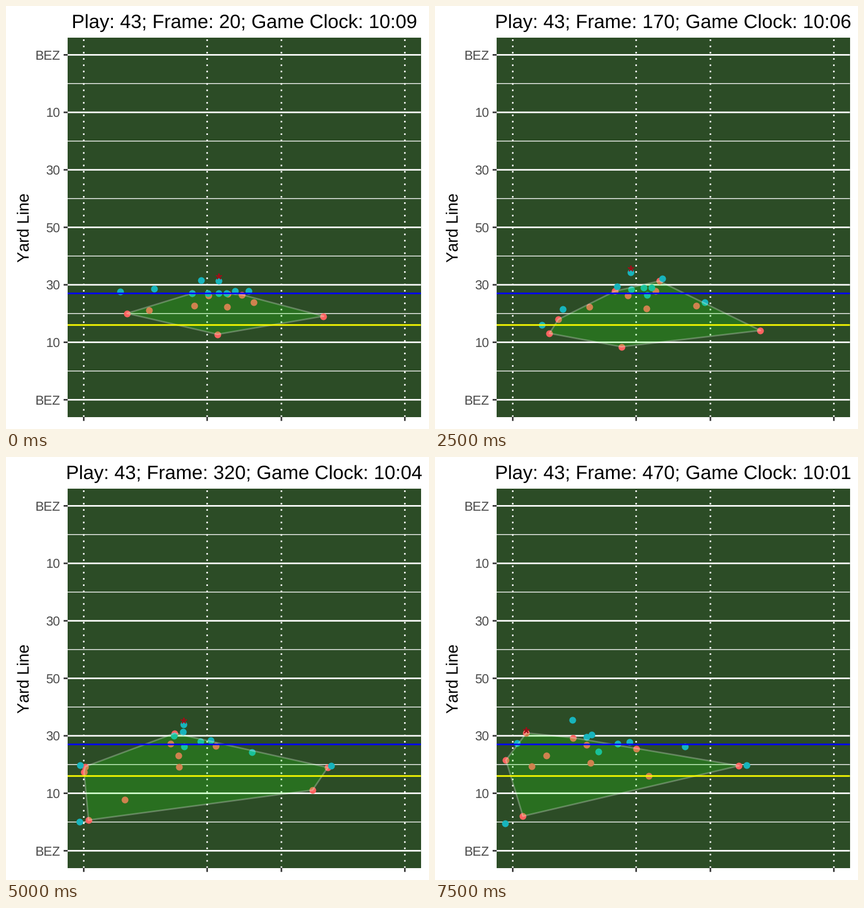
Animation of 748 by 748 pixels, one loop 8 s. Source, as a matplotlib script:

```python
import numpy as np
import matplotlib.pyplot as plt
from matplotlib.animation import FuncAnimation
from matplotlib.patches import Polygon, Rectangle

SIZE, DPI = 748, 187
STEPS, STEP_MS = 16, 500
LEFT, RIGHT, TOP, BOTTOM = 109, 733.7, 56, 726.6
MAJOR, MINOR = 2.77, 1.39
KEYS = np.array([0, 4, 10, 15])
t = np.arange(STEPS)

plt.rcParams["font.family"] = "Liberation Sans"
plt.rcParams["text.hinting"] = "none"
plt.rcParams["text.kerning_factor"] = 6  # no pair kerning


def pt(px):
    return px * 72 / DPI


# --- Motion ---------------------------------------------------------------
def route(*points):
    """Smooth run through one point per key time, starting from rest."""
    p = np.array(points, float)
    slope = np.gradient(p, KEYS, axis=0)
    slope[0] = 0
    k = np.clip(np.searchsorted(KEYS, t, side="right") - 1, 0, len(KEYS) - 2)
    h = (KEYS[k + 1] - KEYS[k])[:, None]
    u = (t - KEYS[k])[:, None] / h
    return ((1 + 2 * u) * (1 - u) ** 2 * p[k]
            + u * (1 - u) ** 2 * h * slope[k]
            + u ** 2 * (3 - 2 * u) * p[k + 1]
            + u ** 2 * (u - 1) * h * slope[k + 1])


def block(x, drift, sag):
    """Step back at the snap, then roll left with the pocket."""
    roll = (np.clip(t - 4, 0, None) / 11) ** 0.8
    step = np.clip(t / 3, 0, 1)
    return np.column_stack([x + drift * roll, 508 - 11 * step + sag * roll])


def rush(blocker, start, end):
    """Stay engaged with a blocker while the offset shifts."""
    ease = (t / t[-1])[:, None] ** 0.7
    return blocker + np.array(start) * (1 - ease) + np.array(end) * ease


left_tackle = block(329.5, -52, -6)
left_guard = block(357, -68, 24)
center = block(376.5, -53, 10)
right_guard = block(390, -46, 7)
right_tackle = route((405.5, 504), (411, 484), (313.5, 485.5), (268.5, 494.5))
passer = route((376, 485.5), (352, 472.5), (314, 473), (243, 464.5))
runner = route((345, 485), (365, 507), (435, 522), (442.5, 511.5))
receivers = [
    route((202, 504.5), (197, 549), (130, 644.5), (124.5, 648)),
    route((262, 499.5), (240, 531), (131.5, 545), (145.5, 505.5)),
    route((429, 504), (461, 520), (575.5, 545.5), (551, 545)),
]
offence = np.array(receivers + [passer, runner, left_tackle, left_guard,
                                center, right_guard, right_tackle])

catcher = route((253, 537.5), (231, 551), (138, 557), (161.5, 488))
coverage = [
    route((214, 543.5), (210, 568), (146, 642), (155.5, 635)),
    route((374, 580.5), (347, 599), (210, 605.5), (171, 547)),
    route((561.5, 548.5), (575, 569), (542, 589), (378, 563.5)),
    route((333, 530), (294, 530), (140, 547.5), (125.5, 536)),
    route((391, 532), (382, 533), (306, 548), (197.5, 528)),
    route((438, 524), (447, 527), (569, 549), (537.5, 546)),
]
rushers = [
    rush(left_tackle, (0, 0), (-9, 18)),
    rush(left_guard, (1, 3.5), (-14, 20)),
    rush(right_guard, (2, 1), (12, 12)),
    rush(right_tackle, (11.5, 6.5), (-24, 2)),
]
defence = np.array([catcher] + coverage + rushers)

# Held by the passer, thrown, then carried by the catcher
flight = np.clip((t - 11) / 2, 0, 1)[:, None]
ball = (passer + [0, -7.5]) * (1 - flight) + (catcher + [0, -5]) * flight


def convex_hull(points):
    pts = sorted(map(tuple, points))

    def chain(seq):
        out = []
        for p in seq:
            while len(out) > 1:
                (x0, y0), (x1, y1) = out[-2:]
                if (x1 - x0) * (p[1] - y0) > (y1 - y0) * (p[0] - x0):
                    break
                out.pop()
            out.append(p)
        return out[:-1]

    return chain(pts) + chain(pts[::-1])


# --- Drawing --------------------------------------------------------------
fig = plt.figure(figsize=(SIZE / DPI, SIZE / DPI), dpi=DPI, facecolor="white")
ax = fig.add_axes([0, 0, 1, 1])
ax.set_xlim(0, SIZE)
ax.set_ylim(SIZE, 0)
ax.axis("off")

field = Rectangle((LEFT, TOP), RIGHT - LEFT, BOTTOM - TOP, fc="#2C4C26", lw=0)
ax.add_patch(field)


def line(xs, ys, color, width, **kw):
    ax.plot(xs, ys, color=color, lw=pt(width), solid_capstyle="butt",
            dash_capstyle="butt", snap=False, **kw)


for k, label in enumerate(["BEZ", "10", "30", "50", "30", "10", "BEZ"]):
    y = 86.4 + 101.65 * k
    line([LEFT, RIGHT], [y, y], "white", MAJOR)
    if k < 6:
        line([LEFT, RIGHT], [y + 50.83] * 2, "white", MINOR)
    line([LEFT - 7.1, LEFT], [y, y], "#333333", MAJOR)
    ax.text(96, y + 8.2, label, ha="right", va="baseline",
            size=8.8, color="#4D4D4D")
for x in (137.5, 355.7, 487, 705.3):
    line([x, x], [BOTTOM, TOP], "white", MAJOR, ls=(0, (1, 3)))
    line([x, x], [BOTTOM, BOTTOM + 7.1], "#333333", MAJOR)
line([LEFT, RIGHT], [508.2, 508.2], "blue", MAJOR, zorder=6)
line([LEFT, RIGHT], [564.1, 564.1], "yellow", MAJOR, zorder=6)

ax.text(40.5, 391.3, "Yard Line", rotation=90, rotation_mode="anchor",
        ha="center", va="baseline", size=11)
title = ax.text(421.4, 39.2, "", ha="center", va="baseline", size=13.2)


def markers(color, z, **kw):
    return ax.plot([], [], ls="", color=color, zorder=z, snap=False,
                   clip_path=field, **kw)[0]


red_dots = markers("#FC6360", 3, marker="o", ms=pt(12), mew=0)
teal_dots = markers("#18B4BC", 4, marker="o", ms=pt(12), mew=0)
star = markers("#9B1018", 7, marker=(5, 2, 0), ms=pt(11), mew=pt(2))
hull = Polygon([(0, 0), (1, 0), (0, 1)], closed=True, fc=(0.12, 1, 0.04, 0.2),
               ec=(1, 1, 1, 0.27), lw=pt(2.77), joinstyle="round", zorder=5)
ax.add_patch(hull)
hull.set_clip_path(field)


def update(i):
    title.set_text(f"Play: 43; Frame: {20 + 30 * i}; "
                   f"Game Clock: 10:{9 - (i + 1) // 2:02d}")
    red_dots.set_data(*defence[:, i].T)
    teal_dots.set_data(*offence[:, i].T)
    hull.set_xy(convex_hull(defence[:, i]))
    star.set_data(*ball[i:i + 1].T)
    return title, red_dots, teal_dots, hull, star


anim = FuncAnimation(fig, update, frames=STEPS, interval=STEP_MS,
                     repeat=True, repeat_delay=0, blit=False)
plt.show()
```
